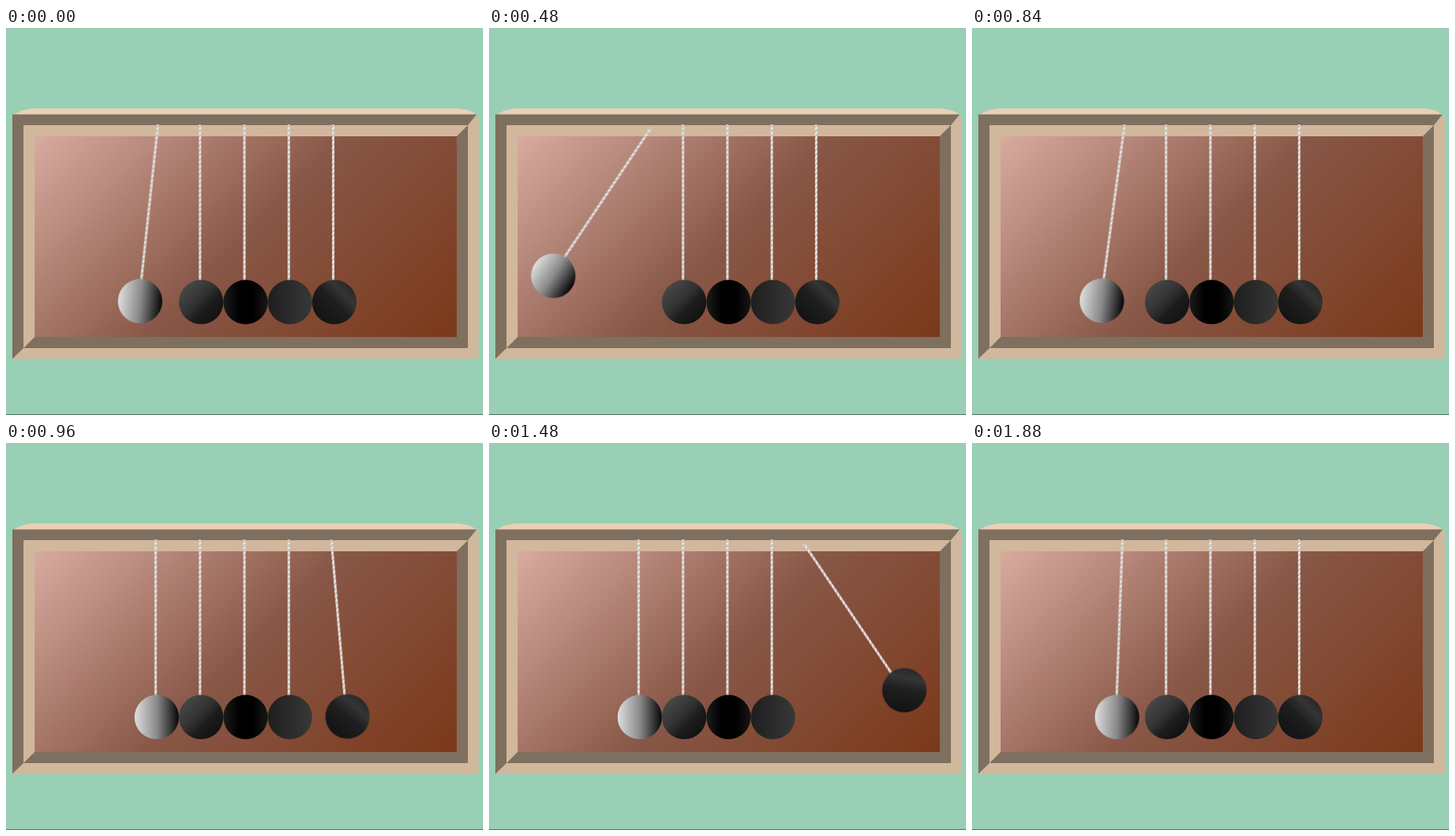
Animation of 600 by 486 pixels, one loop 1920 ms. Source, as an HTML page:

```html
<!DOCTYPE html>
<html lang="en">
<head>
<meta charset="utf-8">
<title>Pendulum</title>
<style>
  html, body { margin: 0; width: 100%; height: 100%; overflow: hidden; background: #99cfb5; }
  svg { display: block; width: 600px; height: 486px; }
  .light { fill: #d1b79c; }
  .dark { fill: #7f6f5f; }
  .swing {
    animation: 1920ms linear infinite paused;
    animation-delay: calc(var(--t, 62) * -1ms);
  }
  #left { transform-origin: 189.5px 149px; animation-name: left; }
  #right { transform-origin: 412.8px 149px; animation-name: right; }
  /* rise slows towards the peak, fall mirrors it */
  @keyframes left {
    0% { transform: rotate(0deg); animation-timing-function: cubic-bezier(.33, .45, .55, 1); }
    25.94% { transform: rotate(34.1deg); animation-timing-function: cubic-bezier(.45, 0, .67, .55); }
    50.83%, 100% { transform: rotate(0deg); }
  }
  @keyframes right {
    0%, 50.83% { transform: rotate(0deg); animation-timing-function: cubic-bezier(.33, .45, .55, 1); }
    75.68% { transform: rotate(-35.4deg); animation-timing-function: cubic-bezier(.45, 0, .67, .55); }
    100% { transform: rotate(0deg); }
  }
</style>
</head>
<body>
<svg viewBox="0 0 600 486">
  <defs>
    <linearGradient id="wall" gradientUnits="userSpaceOnUse" x1="105.75" y1="66.25" x2="497.25" y2="457.75">
      <stop offset="0" stop-color="#d8ab9f"/>
      <stop offset=".5" stop-color="#885747"/>
      <stop offset="1" stop-color="#7b3819"/>
    </linearGradient>
    <linearGradient id="steel">
      <stop offset="0" stop-color="#dedede"/>
      <stop offset=".5" stop-color="#8a8a8a"/>
      <stop offset="1" stop-color="#050505"/>
    </linearGradient>
    <linearGradient id="slate" x1="0" y1="0" x2="1" y2="1">
      <stop offset=".1" stop-color="#4a4a4a"/>
      <stop offset=".45" stop-color="#323232"/>
      <stop offset=".62" stop-color="#1c1c1c"/>
      <stop offset="1" stop-color="#0c0c0c"/>
    </linearGradient>
    <linearGradient id="coal">
      <stop offset="0" stop-color="#1c1c1c"/>
      <stop offset=".35" stop-color="#000"/>
      <stop offset=".65" stop-color="#000"/>
      <stop offset="1" stop-color="#161616"/>
    </linearGradient>
    <linearGradient id="iron">
      <stop offset="0" stop-color="#1e1e1e"/>
      <stop offset="1" stop-color="#383838"/>
    </linearGradient>
    <linearGradient id="onyx" x1="0" y1="1" x2="1" y2="0">
      <stop offset=".1" stop-color="#121212"/>
      <stop offset=".5" stop-color="#1e1e1e"/>
      <stop offset=".7" stop-color="#353535"/>
      <stop offset="1" stop-color="#1c1c1c"/>
    </linearGradient>
    <pattern id="twist" width="3" height="6" patternUnits="userSpaceOnUse" x="-1.5">
      <rect width="3" height="6" fill="#eae8e5"/>
      <path d="M0 5L3 1" stroke="#aaa5a0" stroke-width="1.1"/>
    </pattern>
    <rect id="rope" x="-1.5" y="121" width="3" height="197" rx="1" fill="url(#twist)"/>
  </defs>

  <rect width="600" height="486" fill="#99cfb5"/>
  <rect y="485" width="600" height="1" fill="#56736a"/>

  <path d="M8 110Q18 102 34 101H568Q584 102 592 109Z" fill="#e9d0b5"/>
  <path class="light" d="M594.5 109.5V415.5H8L22 402H581V122L592 109.5Z"/>
  <path class="dark" d="M8 108.5H592L581 122H22V402L8 415.5Z"/>
  <path class="light" d="M22 122H581L567 136H36V388L22 402Z"/>
  <path class="dark" d="M581 122V402H22L36 388H567V136Z"/>
  <rect x="36" y="136" width="531" height="252" fill="url(#wall)"/>

  <g id="balls"></g>
</svg>
<script>
  const PERIOD = 1920, STEP = 40, PHASE = 62;
  const skins = ['steel', 'slate', 'coal', 'iron', 'onyx'];
  const sides = { 0: 'id="left" class="swing"', 4: 'id="right" class="swing"' };

  document.getElementById('balls').innerHTML = skins.map((skin, i) => {
    const x = 188.2 + i * 55.85;
    return `<g ${sides[i] || ''}><use href="#rope" x="${x}"/>
      <circle cx="${x + 1.4}" cy="344.2" r="27.9" fill="url(#${skin})"/></g>`;
  }).join('');

  const start = performance.now();
  function draw() {
    const time = Math.max(0, performance.now() - start) % PERIOD;
    const held = Math.floor(time / STEP) * STEP;
    document.documentElement.style.setProperty('--t', (held + PHASE) % PERIOD);
    requestAnimationFrame(draw);
  }
  draw();
</script>
</body>
</html>
```
